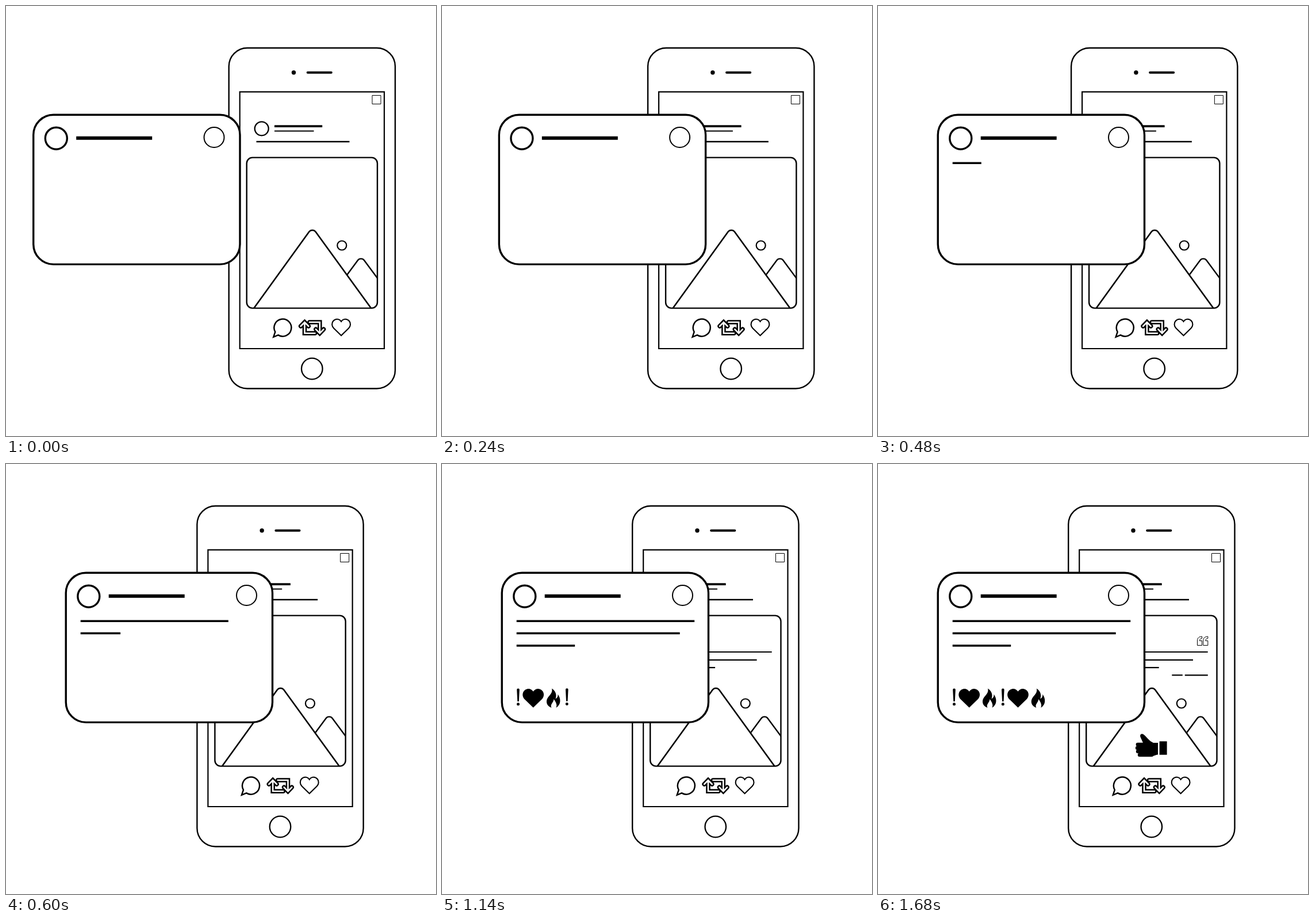
Recreate the animation shown at these times as an HTML page with a canvas. Size 748x748 px, loop 3 s.

```html
<!DOCTYPE html>
<html lang="en">
<head>
<meta charset="utf-8">
<title>Post and phone</title>
<style>
  html, body { margin: 0; width: 100%; height: 100%; overflow: hidden; background: #fff; }
  canvas { display: block; width: 748px; height: 748px; }
</style>
</head>
<body>
<canvas id="stage"></canvas>
<script>
const SIZE = 748, LOOP = 3000, STEP = 30, LAST = 1680;
const SHIFT = 56.5, LINE_TIME = 320;
const canvas = document.getElementById('stage');
const ctx = canvas.getContext('2d');
const dpr = window.devicePixelRatio || 1;
canvas.width = canvas.height = SIZE * dpr;

const clamp = x => Math.min(1, Math.max(0, x));
const progress = (t, start, length) => clamp((t - start) / length);

// Bezier ease (.28, 0, .23, 1), solved by bisection
function ease(x) {
  if (x <= 0 || x >= 1) return clamp(x);
  let lo = 0, hi = 1;
  for (let i = 0; i < 24; i++) {
    const s = (lo + hi) / 2, r = 1 - s;
    if (3 * r * r * s * .28 + 3 * r * s * s * .23 + s * s * s < x) lo = s;
    else hi = s;
  }
  return lo * lo * (3 - 2 * lo);
}

function easeBack(x) {
  const c = 1.6, u = x - 1;
  return 1 + (c + 1) * u ** 3 + c * u * u;
}

function stroke(width, path) {
  ctx.lineWidth = width;
  path ? ctx.stroke(path) : ctx.stroke();
}

function line(x1, x2, y, width, cap = 'butt') {
  ctx.lineCap = cap;
  ctx.beginPath();
  ctx.moveTo(x1, y);
  ctx.lineTo(x2, y);
  stroke(width);
}

function growLine(t, start, x1, x2, y, width) {
  const p = ease(progress(t, start, LINE_TIME));
  if (p > 0) line(x1, x1 + (x2 - x1) * p, y, width);
}

function disc(x, y, r) {
  ctx.beginPath();
  ctx.arc(x, y, r, 0, Math.PI * 2);
}

function ring(x, y, r, width) {
  disc(x, y, r);
  stroke(width);
}

function box(x1, y1, x2, y2, r, width) {
  ctx.beginPath();
  ctx.roundRect(x1, y1, x2 - x1, y2 - y1, r);
  stroke(width);
}

function scaled(x, y, s, draw) {
  if (s <= 0) return;
  ctx.save();
  ctx.translate(x, y);
  ctx.scale(s, s);
  ctx.translate(-x, -y);
  draw();
  ctx.restore();
}

// Unit-free heart, 37 wide and 33 high, centred on x = 0 with its lobes at y = 0
const heart = new Path2D('M0 33 L-15 18.5 C-19 14.5 -19.5 8 -16 4 C-11.5 -1.2 -4 -1 0 5 C4 -1 11.5 -1.2 16 4 C19.5 8 19 14.5 15 18.5 Z');
const flame = new Path2D('M191 390.5 C198 395 200 402 197.5 408.5 C201 406.5 201.8 404 201.5 400.5 C207 408 207.5 418.5 198.5 424 C201 418 197.5 414 194.5 409 C194 415.5 187.5 418 190.5 424 C181 420.5 179.5 411.5 185.5 404.5 C190 399.5 192.5 396 191 390.5 Z');
const bang = new Path2D('M130.2 392.5 Q130.2 390.6 132.5 390.6 Q134.8 390.6 134.8 392.5 L133.8 412 Q133.7 413.2 132.5 413.2 Q131.3 413.2 131.2 412 Z M135 417.8 A2.5 2.5 0 1 1 130 417.8 A2.5 2.5 0 1 1 135 417.8 Z');
const bubble = new Path2D('M411.8 567 A15 15 0 1 1 417 572.4 L408.8 575.8 Z');
const repost = new Path2D('M456.2 557 L463 550 L469.8 557 M463 550 V569.3 H481 M471.5 550 H489.3 V569.3 M482.5 562.3 L489.3 569.3 L496 562.3');
const quote = new Path2D('M0 16 V7.5 C0 3 3 .7 8 .5 V3.8 C5.2 4.2 4 5.5 4 8 H8 V16 Z');
const palm = new Path2D('M487 485 H479 C471 481.5 468 475 462 470.5 C458.5 468 455 470.5 456.5 475 L461 485 C456 488 457 505 461 508 H478 C481 508 483 505.5 487 505.5 Z');

function mountains() {
  ctx.save();
  ctx.beginPath();
  ctx.rect(362, 263, 227.5, 262.5);
  ctx.clip();
  ctx.beginPath();
  ctx.moveTo(536.5, 468);
  ctx.arcTo(561, 434.8, 590, 474, 7);
  ctx.lineTo(590, 474);
  stroke(2.4);
  ctx.beginPath();
  ctx.moveTo(374.5, 526);
  ctx.arcTo(476.4, 385, 578.8, 526, 7);
  ctx.lineTo(578.8, 526);
  stroke(2.6);
  ctx.restore();
}

function thumb() {
  ctx.fill(palm);
  [[451.8, 488], [451, 494], [452, 500], [455, 506]]
    .forEach(([x, y]) => line(x, 476, y, 6.4, 'round'));
  ctx.fillRect(489.6, 482.4, 13, 23.4);
}

function phone(t) {
  ctx.save();
  ctx.translate(SHIFT * (1 - ease(progress(t, 0, 732))), 0);
  box(331.2, 73, 620.5, 665.5, 32, 2.4);
  box(350.2, 149.4, 601.5, 596, 0, 2.2);
  box(580.5, 155.5, 595.5, 170.5, 0, 1);
  disc(444, 115.7, 3.7);
  ctx.fill();
  line(468.2, 509.3, 115.7, 4, 'round');
  ring(475.8, 631, 18.3, 2.3);

  ring(388.2, 213.3, 12, 2.3);
  line(410.5, 493.7, 209.2, 3.7);
  line(410.5, 479, 217.5, 2.2);
  line(379, 541, 236, 2.3);

  box(362.2, 263.6, 589.5, 525.6, 10, 2.4);
  mountains();
  ring(527.8, 416.5, 8, 2.2);

  stroke(2.5, bubble);
  ctx.lineCap = 'round';
  stroke(7.6, repost);
  ctx.strokeStyle = '#fff';
  stroke(2.6, repost);
  ctx.strokeStyle = '#000';
  ctx.save();
  ctx.translate(526.6, 544.5);
  ctx.scale(.87, .87);
  stroke(2.4, heart);
  ctx.restore();

  growLine(t, 732, 378, 573.7, 327, 2.2);
  growLine(t, 840, 378, 548, 340.8, 2.2);
  growLine(t, 948, 378, 488.7, 354.2, 2.2);
  growLine(t, 1164, 511.3, 529.8, 367.3, 2.2);
  growLine(t, 1240, 533.8, 573.8, 367.3, 2.2);

  scaled(564.5, 307.5, ease(progress(t, 1150, 240)), () => {
    for (const x of [555.5, 565.8]) {
      ctx.save();
      ctx.translate(x, 299.5);
      stroke(1, quote);
      ctx.restore();
    }
  });
  const grow = progress(t, 1380, 300);
  if (grow > 0) scaled(475.5, 489.5, easeBack(grow), thumb);
  ctx.restore();
}

function reactions(t) {
  const centers = [132.5, 158.7, 194];
  for (let i = 0; i < 6; i++) {
    const x = progress(t, 690 + i * 120, 120);
    if (x <= 0) continue;
    const p = ease(x), kind = i % 3;
    ctx.save();
    ctx.translate(i > 2 ? 84.8 : 0, -8 * (1 - p));
    scaled(centers[kind], 407, .9 + .1 * p, () => {
      if (kind === 0) ctx.fill(bang);
      else if (kind === 2) ctx.fill(flame);
      else {
        ctx.translate(158.7, 390.8);
        ctx.fill(heart);
      }
    });
    ctx.restore();
  }
}

function card(t) {
  ctx.save();
  ctx.translate(-SHIFT * (1 - ease(progress(t, 0, 366))), 0);
  ctx.fillStyle = '#fff';
  ctx.beginPath();
  ctx.roundRect(104.2, 189.2, 359.3, 260.2, 35);
  ctx.fill();
  stroke(3.4);
  ctx.fillStyle = '#000';
  ring(143.8, 230.2, 19, 3.4);
  line(178.7, 310.7, 229.8, 6);
  ring(418.5, 228.5, 17.5, 2);
  growLine(t, 426, 129.7, 439.2, 273.2, 3.6);
  growLine(t, 534, 129.7, 413.7, 294.5, 3.6);
  growLine(t, 642, 129.7, 231.2, 316, 3.6);
  reactions(t);
  ctx.restore();
}

function render(t) {
  ctx.setTransform(dpr, 0, 0, dpr, 0, 0);
  ctx.fillStyle = '#fff';
  ctx.fillRect(0, 0, SIZE, SIZE);
  ctx.fillStyle = ctx.strokeStyle = '#000';
  ctx.lineJoin = 'miter';
  phone(t);
  card(t);
}

const begin = performance.now();
function tick() {
  const t = (performance.now() - begin) % LOOP;
  render(Math.min(LAST, Math.floor(t / STEP) * STEP));
  requestAnimationFrame(tick);
}
tick();
</script>
</body>
</html>
```
